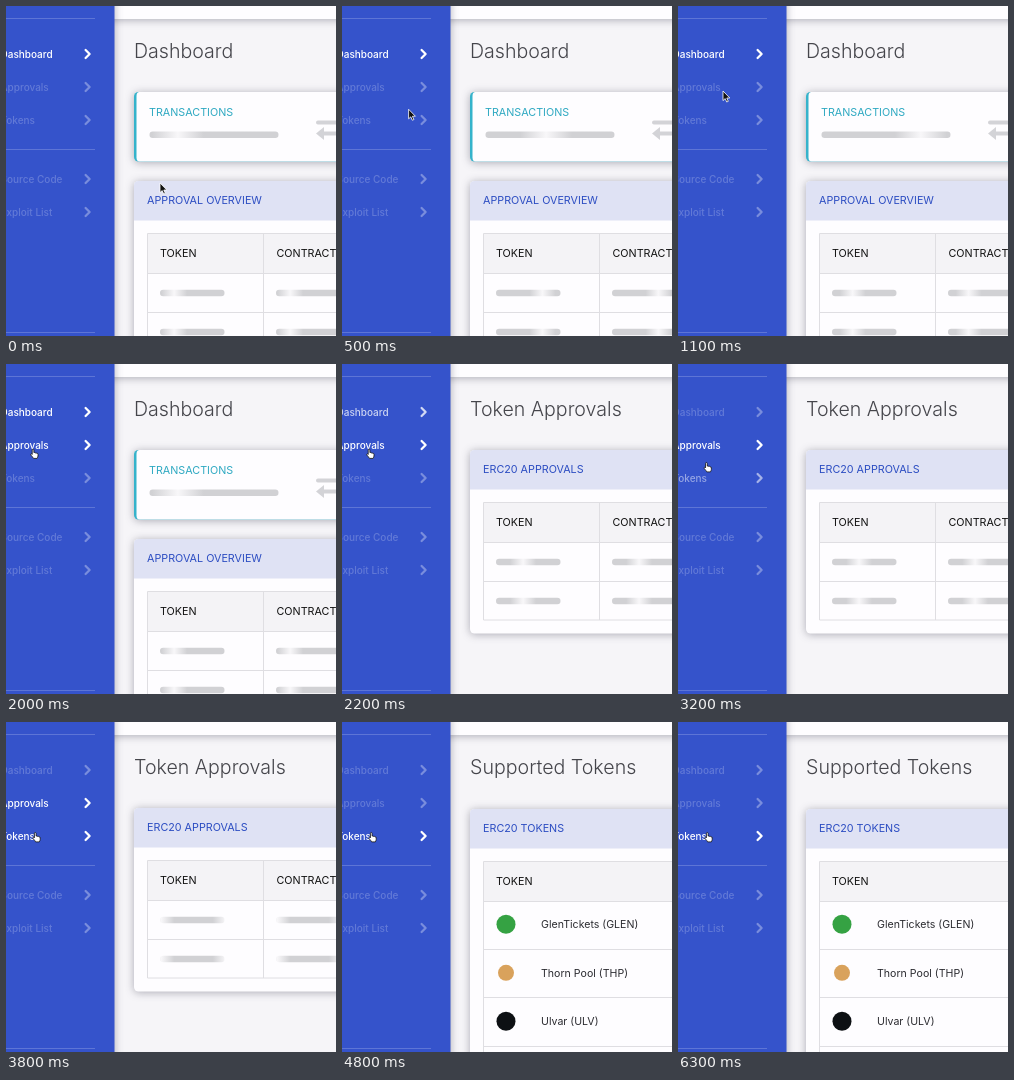
Animation, 330 px wide and 330 px high, one loop 6.4 s. Source, as an HTML page:

```html
<!DOCTYPE html>
<html lang="en">
<head>
<meta charset="utf-8">
<title>Token dashboard</title>
<style>
  html, body { margin: 0; width: 100%; height: 100%; overflow: hidden; background: #f6f5f8; }
  svg { display: block; width: 100vw; height: 100vh; font-family: Inter, Roboto, sans-serif; }
  text { white-space: pre; }
  .title { font-size: 19.6px; font-weight: 300; fill: #45454b; }
  .cap { font-size: 10.75px; font-weight: 400; }
  .row { font-size: 10.6px; fill: #2b2b30; }
  .nav text { font-size: 10px; font-weight: 500; fill: #fff; }
  .nav path { fill: none; stroke: #fff; stroke-width: 2.3; stroke-linecap: round; stroke-linejoin: round; }
  .shadow { filter: drop-shadow(0 1.5px 4.5px rgba(40, 40, 60, .36)); }
  .line { fill: none; stroke: #dfdee2; stroke-width: 1; }
</style>
</head>
<body>
<svg id="stage" viewBox="0 0 330 330">
  <defs>
    <linearGradient id="slow" spreadMethod="repeat">
      <stop offset="0" stop-color="#f8f7f9"/><stop offset=".2" stop-color="#d1d1d4"/>
      <stop offset=".8" stop-color="#d1d1d4"/><stop offset="1" stop-color="#f8f7f9"/>
    </linearGradient>
    <linearGradient id="fast" href="#slow" spreadMethod="repeat"/>
  </defs>
  <rect width="330" height="330" fill="#f6f5f8"/>
  <rect class="shadow" x="100" y="-10" width="260" height="23" fill="#fefdff"/>
  <g id="pages"></g>
  <rect class="shadow" x="-10" y="-10" width="118.5" height="350" fill="#3553cb"/>
  <path d="M0 12.5H89M0 143.5H89M0 326.5H89" stroke="#fff" stroke-opacity=".2"/>
  <g id="nav" class="nav"></g>
  <path id="arrow" d="M0 0V9.6L2.2 7.6L3.7 11L5.3 10.3L3.8 7H6.8Z" fill="#111" stroke="#fff" stroke-width=".8"/>
  <path id="hand" d="M1.7 1Q1.7 0 2.5 0T3.4 1V3.6Q4.4 3.1 4.8 3.9Q5.8 3.5 6.2 4.3Q7.5 4.1 7.5 5.4V7Q7.3 8.2 6.6 9.4H3Q2.2 8 .5 6.2Q-.2 5.1 .7 4.8Q1.3 4.7 1.7 5.4Z"
    fill="#fff" stroke="#111" stroke-width=".8" stroke-linejoin="round"/>
</svg>
<script>
const LOOP = 6400, STEP = 100;
const $ = id => document.getElementById(id);

const label = (x, y, s, cls, fill = "") =>
  `<text x="${x}" y="${y}" class="${cls}"${fill && ` fill="${fill}"`}>${s}</text>`;
const bar = (x, y, w, paint) =>
  `<rect x="${x}" y="${y - 3.2}" width="${w}" height="6.4" rx="3.2" fill="url(#${paint})"/>`;

// Card with a tinted heading and the top strip of its table
function card(y, h, heading, body) {
  return `<rect class="shadow" x="128" y="${y}" width="240" height="${h}" rx="4.5" fill="#fefdff"/>
    <path d="M128 ${y + 39.5}v-35q0-4.5 4.5-4.5H340v39.5z" fill="#dfe2f4"/>
    ${label(141, y + 23, heading, "cap", "#2c4dc2")}
    <rect x="141.5" y="${y + 52.5}" width="220" height="40.5" fill="#f4f3f6"/>
    ${label(154, y + 76.3, "TOKEN", "cap", "#111")}${body}`;
}

function loadingCard(y, h, heading) {
  const bars = [112, 151].map(d => bar(154, y + d, 64.5, "fast") + bar(270, y + d, 64.5, "fast")).join("");
  return card(y, h, heading, `${label(270.5, y + 76.3, "CONTRACT", "cap", "#111")}
    <path class="line" d="M340 ${y + 52.5}H141.5v117.5H340M141.5 ${y + 92.5}H340M141.5 ${y + 131.5}H340M257.5 ${y + 52.5}v117.5"/>${bars}`);
}

const tokens = [
  ["GlenTickets (GLEN)", "#35a243"],
  ["Thorn Pool (THP)", "#d9a25c"],
  ["Ulvar (ULV)", "#0d1013"]
];
const tokenRows = tokens.map(([name, color], i) => {
  const y = 202.3 + i * 48.5;
  return `<circle cx="164" cy="${y}" r="${i === 1 ? 8 : 9.5}" fill="${color}"/>
    ${label(199, y + 4, name, "row")}<path class="line" d="M141.5 ${Math.floor(y + 25) + .5}H340"/>`;
}).join("");

const pages = [
  label(128, 51.8, "Dashboard", "title") +
  `<g class="shadow"><rect x="128" y="86" width="240" height="69.5" rx="4.5" fill="#35b3cb"/>
    <path d="M340 86H133.5Q130.5 86 130.5 90V151.5Q130.5 155.5 133.5 155.5H340Z" fill="#fefdff"/></g>
    ${label(143, 109.5, "TRANSACTIONS", "cap", "#2fa9c2")}${bar(143.5, 128.7, 129, "slow")}
    <path d="M312 116.5H340M317 127.5H340" stroke="#d3d3d7" stroke-width="4" stroke-linecap="round"/>
    <path d="M318 121V134L310 127.5Z" fill="#d3d3d7"/>` +
  loadingCard(175, 200, "APPROVAL OVERVIEW"),
  label(128, 51.8, "Token Approvals", "title") + loadingCard(86, 183.5, "ERC20 APPROVALS"),
  label(128, 51.8, "Supported Tokens", "title") +
  card(87, 300, "ERC20 TOKENS", `<path class="line" d="M340 139.5H141.5V340M141.5 179.5H340"/>${tokenRows}`)
];
$("pages").innerHTML = pages.map(p => `<g>${p}</g>`).join("");

const links = [["Dashboard", 48], ["Approvals", 81], ["Tokens", 114], ["Source Code", 173], ["Exploit List", 206]];
$("nav").innerHTML = links.map(([s, y]) =>
  `<g>${label(-5.5, y + 3.7, s, "")}<path d="M79.6 ${y - 4}l4 4l-4 4"/></g>`).join("");

const pageEls = [...$("pages").children], navEls = [...$("nav").children];
const clamp = v => Math.min(1, Math.max(0, v));
const ramp = (t, a, b) => clamp((t - a) / (b - a));
const ease = p => p * p * (3 - 2 * p);

// Pointer legs: start, end, x, y
const start = [154, 177];
const legs = [[0, 700, 45, 85], [1200, 1600, 24.5, 85], [2200, 2500, 25, 86.5], [3000, 3400, 26.7, 110.5]];
function pointer(t) {
  let [x, y] = start;
  for (const [a, b, tx, ty] of legs) {
    const p = ease(ramp(t, a, b));
    x += (tx - x) * p;
    y += (ty - y) * p;
  }
  return `translate(${x} ${y})`;
}

function draw(t) {
  const page = t < 2100 ? 0 : t < 3900 ? 1 : 2;
  pageEls.forEach((el, i) => el.setAttribute("display", i === page ? "inline" : "none"));

  const lit = [
    1 - ramp(t, 2100, 2400),
    ramp(t, 1400, 1700) - ramp(t, 3900, 4200),
    ramp(t, 3100, 3400), 0, 0
  ];
  navEls.forEach((el, i) => {
    el.children[0].setAttribute("opacity", .22 + .78 * lit[i]);
    el.children[1].setAttribute("opacity", .34 + .66 * lit[i]);
  });

  $("fast").setAttribute("gradientTransform", `translate(${(.22 + t / 1000) % 1} 0)`);
  $("slow").setAttribute("gradientTransform", `translate(${(.22 + t / 2000) % 1} 0)`);

  const over = t >= 1400;
  $("arrow").setAttribute("display", over ? "none" : "inline");
  $("hand").setAttribute("display", over ? "inline" : "none");
  $(over ? "hand" : "arrow").setAttribute("transform", pointer(t));
}

const t0 = performance.now();
function tick(now) {
  const t = Math.max(0, now - t0) % LOOP;
  draw(Math.floor(t / STEP) * STEP);
  requestAnimationFrame(tick);
}
draw(0);
requestAnimationFrame(tick);
</script>
</body>
</html>
```
